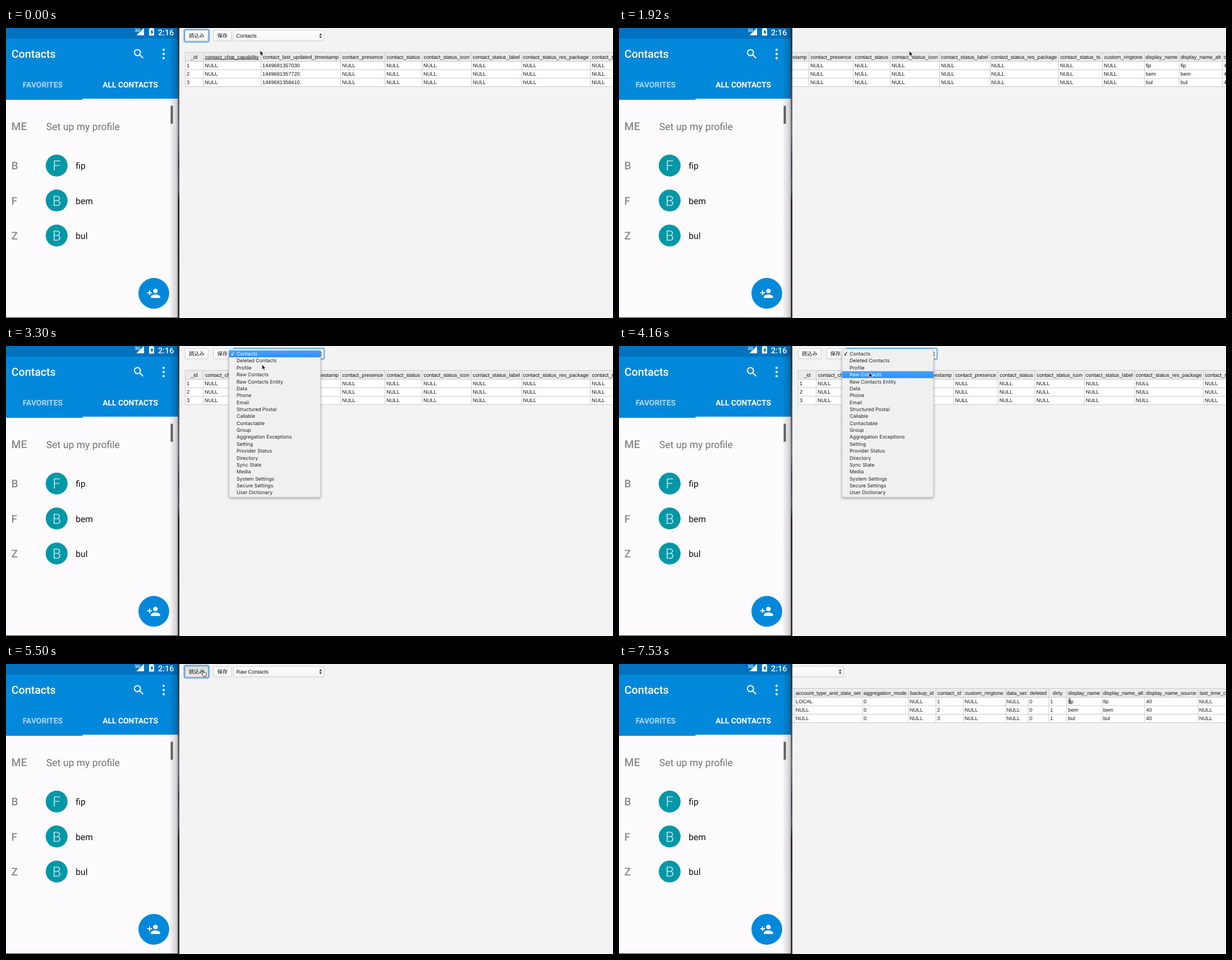
An HTML page for the animation above (8000 ms loop, 1082 by 517 pixels).

```html
<!DOCTYPE html>
<html lang="ja">
<head>
<meta charset="utf-8">
<title>Contacts viewer</title>
<style>
html, body { margin: 0; width: 100%; height: 100%; overflow: hidden; background: #f3f3f3; }
#stage { display: block; }
text { text-rendering: geometricPrecision; white-space: pre; }
.phone text { font-family: Roboto, sans-serif; }
.medium { font-weight: 500; }
.tab { font-size: 13.85px; font-weight: 700; }
.page text { font: 9.23px "Liberation Sans", Arial, sans-serif; fill: #111; }
.page .jp { font-family: "Noto Sans CJK JP", "Noto Sans CJK", sans-serif; }
.page .menu text { font: 8.75px Inter, sans-serif; fill: #222; }
.page .menu .hot text { fill: #fff; }
.grid line { stroke: #cbcbcb; shape-rendering: crispEdges; }
.box { fill: url(#face); stroke: #c2c2c2; stroke-width: .8; }
.ring { fill: none; stroke: #64a9ee; stroke-width: 2; }

/* Every track shares one 8 s clock and jumps between poses. */
.t { animation: 8s step-end infinite; }
.scroll { animation-name: scroll; }
.underline { animation-name: underline; }
.btn-focus { animation-name: btn-focus; }
.sel-focus { animation-name: sel-focus; }
.pressed { animation-name: pressed; }
.label-a { animation-name: label-a; }
.label-b { animation-name: label-b; }
.grid-a { animation-name: grid-a; }
.grid-b { animation-name: grid-b; }
.menu { animation-name: menu; }
.hot0 { animation-name: hot0; }
.hot2 { animation-name: hot2; }
.hot3 { animation-name: hot3; }
.cursor { animation-name: move; }
.arrow { animation-name: arrow; }
.hand { animation-name: hand; }
.beam { animation-name: beam; }

@keyframes scroll {
  0% { transform: translateX(0); }
  12.375% { transform: translateX(-32px); }
  16.125% { transform: translateX(-165px); }
  20.625% { transform: translateX(-250px); }
  24% { transform: translateX(-258px); }
  30% { transform: translateX(-120px); }
  34.5% { transform: translateX(1px); }
  37.875% { transform: translateX(0); }
  80.375% { transform: translateX(-3px); }
  84.375% { transform: translateX(-123.5px); }
  88.125% { transform: translateX(-166.5px); }
}
@keyframes underline { 0% { opacity: 1; } 6% { opacity: 0; } }
@keyframes btn-focus { 0% { opacity: 1; } 41.25% { opacity: 0; } 65.875% { opacity: 1; } }
@keyframes sel-focus { 0% { opacity: 0; } 41.25% { opacity: 1; } 65.875% { opacity: 0; } }
@keyframes pressed { 0% { opacity: 0; } 65.875% { opacity: 1; } 71% { opacity: 0; } }
@keyframes label-a { 0% { opacity: 1; } 62.125% { opacity: 0; } }
@keyframes label-b { 0% { opacity: 0; } 62.125% { opacity: 1; } }
@keyframes grid-a { 0% { opacity: 1; } 68.75% { opacity: 0; } }
@keyframes grid-b { 0% { opacity: 0; } 73.625% { opacity: 1; } }
@keyframes menu {
  0% { opacity: 0; }
  41.25% { opacity: 1; }
  57.625% { opacity: .9; }
  59.875% { opacity: .37; }
  62.125% { opacity: 0; }
}
@keyframes hot0 { 0% { opacity: 1; } 46% { opacity: 0; } }
@keyframes hot2 { 0% { opacity: 0; } 46% { opacity: 1; } 50% { opacity: 0; } }
@keyframes hot3 { 0% { opacity: 0; } 50% { opacity: 1; } }
@keyframes move {
  0% { transform: translate(453px, 40px); }
  2.25% { transform: translate(517.5px, 41px); }
  37.875% { transform: translate(470px, 13px); }
  41.25% { transform: translate(456.5px, 33px); }
  46% { transform: translate(456px, 36px); }
  48% { transform: translate(453px, 41px); }
  50% { transform: translate(449px, 46px); }
  52% { transform: translate(446px, 47px); }
  53.875% { transform: translate(444px, 48px); }
  57.625% { transform: translate(441px, 48px); }
  59.875% { transform: translate(373.5px, 22px); }
  62.125% { transform: translate(352px, 11px); }
  73.625% { transform: translate(372px, 20px); }
  76.25% { transform: translate(560px, 36px); }
  80.375% { transform: translate(685px, 37px); }
  88.125% { transform: translate(770px, 49px); }
  91.5% { transform: translate(790px, 58px); }
  94.125% { transform: translate(803.5px, 66px); }
}
@keyframes arrow {
  0% { opacity: 1; } 62.125% { opacity: 0; } 73.625% { opacity: 1; } 94.125% { opacity: 0; }
}
@keyframes hand { 0% { opacity: 0; } 62.125% { opacity: 1; } 73.625% { opacity: 0; } }
@keyframes beam { 0% { opacity: 0; } 94.125% { opacity: 1; } }
</style>
</head>
<body>
<svg id="stage" width="1082" height="517" viewBox="0 0 1082 517">
  <defs>
    <linearGradient id="face" x2="0" y2="1">
      <stop stop-color="#fff"/><stop offset="1" stop-color="#f4f4f4"/>
    </linearGradient>
    <linearGradient id="down" x2="0" y2="1">
      <stop stop-color="#dcdcdc"/><stop offset="1" stop-color="#ebebeb"/>
    </linearGradient>
    <linearGradient id="blue" x2="0" y2="1">
      <stop stop-color="#4ba0fb"/><stop offset="1" stop-color="#318ffb"/>
    </linearGradient>
    <linearGradient id="shade">
      <stop stop-opacity="0"/><stop offset=".3" stop-opacity=".07"/>
      <stop offset=".7" stop-opacity=".14"/><stop offset="1" stop-opacity=".32"/>
    </linearGradient>
    <linearGradient id="desk" x2="0" y2="1">
      <stop stop-color="#2a2a30"/><stop offset=".2" stop-color="#4a4a50"/>
      <stop offset=".36" stop-color="#6a6a72"/><stop offset=".46" stop-color="#3a3d52"/>
      <stop offset=".55" stop-color="#50505a"/><stop offset=".6" stop-color="#18181b"/>
      <stop offset="1" stop-color="#222226"/>
    </linearGradient>
    <filter id="soft" x="-20%" y="-20%" width="140%" height="140%">
      <feGaussianBlur stdDeviation="2.5"/>
    </filter>
  </defs>

  <rect width="1082" height="517" fill="#f3f3f3"/>

  <svg class="page" x="309" width="773" height="517" viewBox="309 0 773 517">
    <g class="t scroll">
      <rect class="box" x="319.4" y="4.4" width="41" height="18.6" rx="1.5"/>
      <rect class="t pressed" x="319.4" y="4.4" width="41" height="18.6" rx="1.5" fill="url(#down)" stroke="#aaa" stroke-width=".8"/>
      <g class="t btn-focus">
        <rect class="ring" x="318" y="2.8" width="43.6" height="21.6" rx="2.5"/>
        <rect class="ring" x="317.2" y="2" width="45.2" height="23.2" rx="3.5" opacity=".6"/>
      </g>
      <text class="jp" x="326" y="17">読込み</text>
      <rect class="box" x="369.9" y="4.4" width="32" height="18.6" rx="1.5"/>
      <text class="jp" x="376.5" y="17">保存</text>
      <rect class="box" x="405.2" y="4.4" width="161.6" height="18.6" rx="2.5"/>
      <rect class="ring t sel-focus" x="404.8" y="4" width="162.4" height="19.4" rx="2.5"/>
      <text class="t label-a" x="410.5" y="17">Contacts</text>
      <text class="t label-b" x="410.5" y="17">Raw Contacts</text>
      <path d="M558.3 12.7l2.4-3.4 2.4 3.4zm0 2l2.4 3.4 2.4-3.4z" fill="#333"/>
      <g id="gridA" class="grid t grid-a"></g>
      <g id="gridB" class="grid t grid-b"></g>
      <path class="t underline" d="M354 55.9h97" stroke="#333" stroke-width=".9"/>
    </g>
    <g id="menu" class="menu t">
      <rect x="397" y="9" width="164" height="263" rx="4" opacity=".3" filter="url(#soft)"/>
      <rect x="397.4" y="5.2" width="163.4" height="264.6" rx="3.5" fill="#f0f0f0" stroke="#b9b9b9" stroke-width=".7"/>
    </g>
  </svg>

  <g class="phone">
    <rect width="307" height="517" fill="#fdfbfe"/>
    <rect width="307" height="128" fill="#0288db"/>
    <rect width="307" height="19" fill="#0272bf"/>
    <rect x="136.5" y="126" width="170.5" height="2" fill="#fdfbfe"/>
    <g fill="#fff">
      <text class="medium" x="229.5" y="6.5" font-size="8">3G</text>
      <path d="M246 0V13H232.5L238 7.5H240V5.5z"/>
      <path fill-rule="evenodd" d="M257.5 0h4v1h2.5v12.5h-9V1h2.5zM261 2.5l-4 5.5h2.2v4l3.8-5.5h-2z"/>
      <text class="medium" x="271" y="12.7" font-size="14.4">2:16</text>
      <text class="medium" x="9.8" y="53.4" font-size="19.6">Contacts</text>
      <path transform="translate(225 34.5) scale(.98)" d="M15.5 14h-.79l-.28-.27A6.47 6.47 0 0 0 16 9.5 6.5 6.5 0 1 0 9.5 16c1.61 0 3.09-.59 4.23-1.57l.27.28v.79l5 4.99L20.49 19l-4.99-5zm-6 0C7.01 14 5 11.99 5 9.5S7.01 5 9.5 5 14 7.01 14 9.5 11.99 14 9.5 14z"/>
      <circle cx="281" cy="38.8" r="2.1"/>
      <circle cx="281" cy="46.3" r="2.1"/>
      <circle cx="281" cy="53.8" r="2.1"/>
      <text class="tab" x="29.8" y="106" opacity=".68">FAVORITES</text>
      <text class="tab" x="172.2" y="106">ALL CONTACTS</text>
    </g>
    <text class="medium" x="9.5" y="182.3" font-size="19.4" fill="#8a898b">ME</text>
    <text x="71.8" y="182" font-size="17.6" fill="#737274">Set up my profile</text>
    <g id="people"></g>
    <rect x="293.5" y="138.7" width="4" height="32" fill="#666"/>
    <rect x="291" width="16" height="517" fill="url(#shade)"/>
    <circle cx="263.5" cy="473" r="27.4" fill="#0288db"/>
    <path transform="translate(250.8 460.5) scale(1.04)" fill="#fff" d="M15 12c2.21 0 4-1.79 4-4s-1.79-4-4-4-4 1.79-4 4 1.79 4 4 4zm-9-2V7H4v3H1v2h3v3h2v-3h3v-2H6zm9 4c-2.67 0-8 1.34-8 4v2h16v-2c0-2.66-5.33-4-8-4z"/>
    <rect y="516" width="307" height="1" fill="#26262a"/>
    <rect x="306.5" width="2.5" height="517" fill="url(#desk)"/>
  </g>

  <g class="t cursor">
    <path class="t arrow" d="M0 0V8.8L2 7.1 3.5 10.2 5 9.5 3.6 6.5H6.2z" fill="#000" stroke="#fff" stroke-width=".7"/>
    <path class="t hand" d="M-1.2 6.2V1.2C-1.2 0 .5 0 .5 1.2V4.2C1 3.6 2 3.8 2.2 4.5 2.8 4 3.7 4.3 3.8 5 4.5 4.7 5.2 5.1 5.2 5.9V8.2L4.3 11H-.3L-2.6 7.6C-3.2 6.5-2 5.5-1.2 6.2z" fill="#fff" stroke="#111" stroke-width=".9"/>
    <path class="t beam" d="M-2-4.8Q0-4.8 0-3.5 0-4.8 2-4.8M0-3.5V3.5M-2 4.8Q0 4.8 0 3.5 0 4.8 2 4.8M-1.2 1h2.4" fill="none" stroke="#222" stroke-width=".9"/>
  </g>
</svg>

<script>
const $ = id => document.getElementById(id);

function add(parent, tag, attrs, label) {
  const el = document.createElementNS('http://www.w3.org/2000/svg', tag);
  for (const key in attrs) el.setAttribute(key, attrs[key]);
  if (label !== undefined) el.textContent = label;
  return parent.appendChild(el);
}

const names = ['fip', 'bem', 'bul'];
const ids = ['1', '2', '3'];
const same = value => [value, value, value];
const none = same('NULL');
const local = ['LOCAL', 'NULL', 'NULL'];

// Each column: title, width, one value per row.
const contacts = [
  ['_id', 32, ids],
  ['contact_chat_capability', 103, none],
  ['contact_last_updated_timestamp', 142, ['1449681357030', '1449681357720', '1449681358410']],
  ['contact_presence', 79, none],
  ['contact_status', 66, none],
  ['contact_status_icon', 88, none],
  ['contact_status_label', 89.5, none],
  ['contact_status_res_package', 122.5, none],
  ['contact_status_ts', 78, none],
  ['custom_ringtone', 75, none],
  ['display_name', 62, names],
  ['display_name_alt', 77, names],
  ['display_name_source', 95, same('40')]
];
const rawContacts = [
  ['_id', 32, ids],
  ['account_name', 65.5, local],
  ['account_type', 62, local],
  ['account_type_and_data_set', 121, local],
  ['aggregation_mode', 82, same('0')],
  ['backup_id', 49, none],
  ['contact_id', 49, ids],
  ['custom_ringtone', 75, none],
  ['data_set', 40.5, none],
  ['deleted', 37, same('0')],
  ['dirty', 32, same('1')],
  ['display_name', 62.5, names],
  ['display_name_alt', 76.5, names],
  ['display_name_source', 94.5, same('40')],
  ['last_time_contacted', 90, none]
];

function drawGrid(g, columns) {
  const left = 319, top = 43.5, bottom = 104.5;
  const width = columns.reduce((sum, col) => sum + col[1], 0);
  add(g, 'rect', { x: left, y: top, width, height: 16, fill: '#ebebeb' });
  add(g, 'rect', { x: left, y: 59.5, width, height: 45, fill: '#fff' });
  for (const y of [top, 59.5, 74.5, 89.5, bottom])
    add(g, 'line', { x1: left, x2: left + width, y1: y, y2: y });
  let x = left;
  const rule = () => add(g, 'line', { x1: x + .5, x2: x + .5, y1: top, y2: bottom });
  for (const [title, w, values] of columns) {
    rule();
    add(g, 'text', { x: x + w / 2 + .3, y: 54.7, 'text-anchor': 'middle' }, title);
    values.forEach((value, row) => add(g, 'text', { x: x + 3, y: 70.3 + row * 15 }, value));
    x += w;
  }
  rule();
}

const items = ['Contacts', 'Deleted Contacts', 'Profile', 'Raw Contacts', 'Raw Contacts Entity',
  'Data', 'Phone', 'Email', 'Structured Postal', 'Callable', 'Contactable', 'Group',
  'Aggregation Exceptions', 'Setting', 'Provider Status', 'Directory', 'Sync State', 'Media',
  'System Settings', 'Secure Settings', 'User Dictionary'];

function drawMenu(g) {
  const pitch = 12.36;
  const item = (parent, i) => add(parent, 'text', { x: 411, y: 17.1 + i * pitch }, items[i]);
  const tick = (parent, stroke) =>
    add(parent, 'path', { d: 'M401.5 14.2l1.7 2.6 3-6', fill: 'none', stroke, 'stroke-width': 1.1 });
  items.forEach((_, i) => item(g, i));
  tick(g, '#222');
  for (const i of [0, 2, 3]) {
    const hot = add(g, 'g', { class: `hot t hot${i}` });
    add(hot, 'rect', { x: 397.4, y: 7.8 + i * pitch, width: 163.4, height: pitch, fill: 'url(#blue)' });
    item(hot, i);
    if (i === 0) tick(hot, '#fff');
  }
}

function drawPeople(g) {
  names.forEach((name, i) => {
    const y = 245.2 + i * 62.4;
    add(g, 'text', { class: 'medium', x: 9.5, y: y + 7, 'font-size': 19, fill: '#8a898b' }, 'BFZ'[i]);
    add(g, 'circle', { cx: 90.3, cy: y, r: 19.5, fill: '#0097a7' });
    add(g, 'text', { x: 90.3, y: y + 9, 'font-size': 25, 'font-weight': 300,
      'text-anchor': 'middle', fill: '#d9f0f2' }, name[0].toUpperCase());
    add(g, 'text', { x: 124.3, y: y + 6, 'font-size': 15.6, fill: '#111' }, name);
  });
}

drawGrid($('gridA'), contacts);
drawGrid($('gridB'), rawContacts);
drawMenu($('menu'));
drawPeople($('people'));
</script>
</body>
</html>
```
